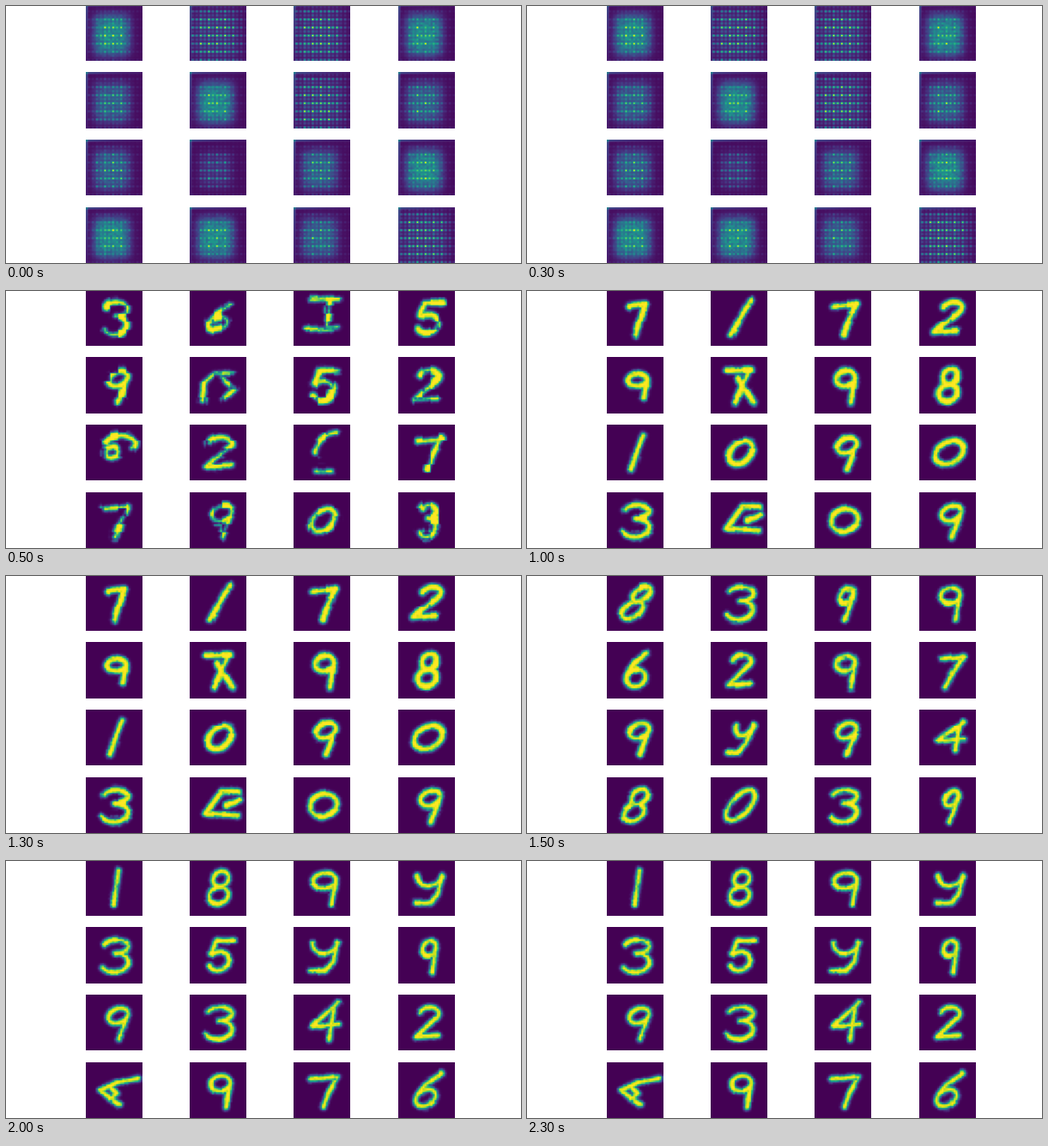
These frames come from a looping animation (600x300 px, 2.5 s). A matplotlib script:

```python
import numpy as np
import matplotlib.pyplot as plt
from matplotlib.animation import FuncAnimation

W, H, N = 600, 300, 28
TILE_W, TILE_H = 66, 65.6
cells = (np.arange(N) + 0.5) / N * TILE_W
X, Y = np.meshgrid(cells, cells)
CX, CY = 35, 33
rng = np.random.default_rng(4)


def arc(cx, cy, rx, ry, start=0, end=360):
    a = np.radians(np.linspace(start, end, 60))
    return np.column_stack([cx + rx * np.cos(a), cy + ry * np.sin(a)])


def line(*xy):
    p = np.reshape(xy, (-1, 2))
    t = np.linspace(0, len(p) - 1, 30 * (len(p) - 1))
    k = np.arange(len(p))
    return np.column_stack([np.interp(t, k, p[:, 0]), np.interp(t, k, p[:, 1])])


# Upright strokes in pixels around the middle of a tile.
GLYPHS = {
    "0": [arc(0, 0, 13, 18)],
    "1": [line(0, -20, 0, 20)],
    "2": [arc(0, -10, 11, 8, 190, 400), line(8, -5, -12, 17), line(-12, 17, 13, 15)],
    "3": [arc(-1, -10, 12, 8, 200, 450), arc(0, 9, 13, 11, -90, 150)],
    "4": [line(14, -24, -13, 5, 18, 2), line(10, -18, 9, 20)],
    "5": [line(14, -17, -6, -17, -10, -2), arc(0, 7, 12, 11, 230, 510)],
    "6": [line(8, -20, -6, -6, -11, 8), arc(0, 9, 11, 10)],
    "7": [line(-14, -13, 12, -16, 5, 4, 2, 20)],
    "8": [arc(0, -10, 9, 9), arc(0, 9, 11, 10)],
    "9": [arc(0, -8, 11, 9), line(11, -8, 10, 20)],
    "y": [arc(0, -16, 15, 14, 10, 170), line(14, -14, 12, 8, 4, 18, -13, 18)],
    "k": [line(-18, 0, 0, -9, 24, -14), line(-16, 2, 7, 17), line(-8, -4, 2, 4, -6, 10)],
    "x": [line(-18, -17, 9, -18), line(8, -18, -4, 20), line(-4, -8, 18, 20)],
    "z": [line(20, -16, 0, -17, -15, 10, 22, 12), line(22, -6, 8, 0)],
    "I": [line(-16, -21, 14, -22), line(5, -18, 5, 8), line(-18, 14, 18, 11)],
    "m": [line(-18, 18, -18, -4, -8, -13, 14, -13), line(0, -10, 18, 4, 8, 15)],
    "c": [arc(3, -10, 17, 10, 200, 390), arc(-4, 0, 7, 6)],
    "h": [arc(12, 0, 22, 23, 180, 270), line(-6, 22, 12, 22)],
}


def write(token, weight, blotch):
    """Marks after the glyph: / leans, | narrows, + widens, - flattens."""
    p = np.vstack(GLYPHS[token[0]])
    lean = 0.13 + 0.22 * token.count("/")
    x = p[:, 0] * 0.7 ** token.count("|") * 1.2 ** token.count("+")
    y = p[:, 1] * 0.75 ** token.count("-")
    x = CX + x - lean * y
    dist = np.hypot(X[..., None] - x, Y[..., None] - (CY + y)).min(axis=2)
    uneven = np.kron(rng.normal(size=(N // 4, N // 4)), np.ones((4, 4)))
    grain = 0.25 * rng.normal(size=dist.shape)
    ink = weight + blotch * uneven + grain - dist
    return np.clip(1.05 / (1 + np.exp(-ink / 0.85)), 0, 1)


def page(text, weight, blotch):
    return [write(token, weight, blotch) for token in text.split()]


# Radius, strength of the dots, strength of the glow.
STYLES = {"lines": (28, 0.88, 0.07), "glow": (21, 0.45, 0.42),
          "mixed": (21, 0.55, 0.24), "faint": (19, 0.5, 0.08)}


def lattice(style):
    """Checkered dots with a period of four cells over a soft glow."""
    radius, dots, glow = STYLES[style]
    r, c = np.mgrid[:N, :N]
    env = np.exp(-((X - 30) / radius) ** 4 - ((Y - 36) / (radius + 3)) ** 4)
    row = np.choose(r % 4, [0.1, 0.3, 0.05, 1.0])
    col = np.choose(c % 4, [0.1, 1.0, 0.2, 0.65])
    v = dots * row * col * (env + 0.1) + glow * env
    v = v * rng.uniform(0.75, 1.15, v.shape) + 0.03
    edge = 0.2 * np.exp(-cells / 40)
    v[0] += edge
    v[:, 0] += edge
    return np.clip(v, 0, 1)


start = """glow lines lines glow  mixed glow lines mixed
           mixed faint mixed glow  glow glow mixed lines"""
sheets = [
    [lattice(style) for style in start.split()],
    page("3 6/- I 5   9/ m 5 2    c 2+ h 7     7 9/ 0/- 3|", 2.8, 1.3),
    page("7| 1// 7 2/ 9- x 9 8    1/ 0/- 9/ 0/+- 3+ z 0+- 9/", 3.7, 0.5),
    page("8// 3+ 9|/ 9  6 2 9 7/  9/ y|/ 9/ 4- 8/ 0// 3+ 9|/", 3.3, 0.5),
    page("1 8 9+ y    3+ 5 y 9|   9/ 3+ 4 2    k 9 7+ 6/", 3.1, 0.4),
]

fig = plt.figure(figsize=(W / 100, H / 100), dpi=100, facecolor="white")
ax = fig.add_axes([0, 0, 1, 1])
ax.axis("off")


def place(k):
    left, top = 92.9 + 121.27 * (k % 4), -2 + 78.92 * (k // 4)
    box = np.round([left, left + TILE_W, top + TILE_H, top])
    return ax.imshow(sheets[0][k], cmap="viridis", vmin=0, vmax=1, aspect="auto", extent=box)


images = [place(k) for k in range(16)]
ax.set(xlim=(0, W), ylim=(H, 0))


def draw(i):
    for image, data in zip(images, sheets[i]):
        image.set_data(data)
    return images


anim = FuncAnimation(fig, draw, frames=len(sheets), interval=500, repeat=True, repeat_delay=0)
plt.show()
```
